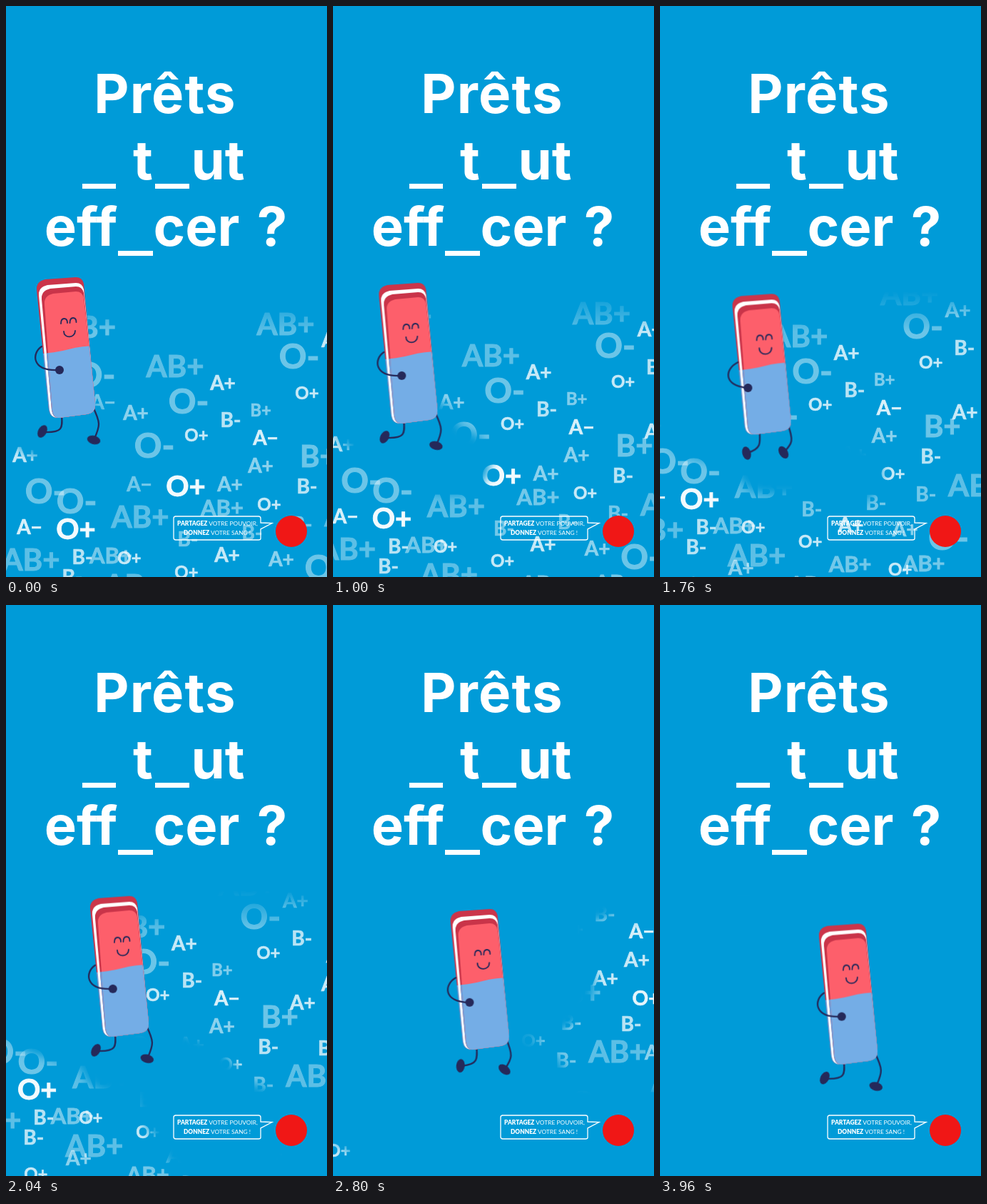
An HTML page that plays this animation: 450x800 px, repeating every 4 s.

```html
<!DOCTYPE html>
<html lang="fr">
<head>
<meta charset="utf-8">
<title>Prêts à tout effacer ?</title>
<style>
  html, body { margin: 0; width: 100%; height: 100%; overflow: hidden; background: #009bd8; }
  svg { display: block; width: 100vw; height: 100vh; }
  .title { font: 700 76px Inter, sans-serif; fill: #fff; text-anchor: middle; }
  .letters { font-family: Lato, sans-serif; font-weight: 700; fill: #fff; stroke: #fff; text-anchor: middle; }
  .letters text { stroke-width: .025em; }
  .slogan { font: 400 8.4px Lato, sans-serif; fill: #fff; text-anchor: middle; }
  .slogan tspan { font-weight: 900; }
  .line { fill: none; stroke: #25295a; stroke-width: 2.3; stroke-linecap: round; }
  .dark { fill: #25295a; }
</style>
</head>
<body>
<svg viewBox="0 0 450 800">
  <defs>
    <linearGradient id="fade" x1="0" y1="400" x2="0" y2="456" gradientUnits="userSpaceOnUse">
      <stop offset="0" stop-color="#000"/>
      <stop offset="1" stop-color="#fff"/>
    </linearGradient>
    <filter id="soft" x="-100" y="300" width="650" height="600" filterUnits="userSpaceOnUse">
      <feGaussianBlur stdDeviation="7"/>
    </filter>
    <mask id="rubbed" x="0" y="0" width="450" height="800" maskUnits="userSpaceOnUse">
      <rect width="450" height="800" fill="url(#fade)"/>
      <g filter="url(#soft)">
        <rect id="wake" x="-400" y="330" width="506" height="246"/>
        <g id="strokes" fill="none" stroke="#000" stroke-linecap="round" stroke-linejoin="round"/>
      </g>
    </mask>
    <clipPath id="sleeve"><path d="M40 488Q70 486 88 481T130 476V600H40Z"/></clipPath>
  </defs>

  <rect width="450" height="800" fill="#009bd8"/>
  <g mask="url(#rubbed)"><g id="letters" class="letters"></g></g>

  <g class="title">
    <text x="223" y="150" letter-spacing="1.2">Prêts</text>
    <text x="192" y="243">t</text>
    <text x="297" y="243">ut</text>
    <text x="105" y="336">eff</text>
    <text x="267" y="336">cer</text>
    <text x="373" y="336">?</text>
    <path d="M107 249h47v7h-47zM209 249h48v7h-48zM157 343h49v7h-49z"/>
  </g>

  <path d="M237 715H354Q357 715 357 718V724L373 724.5 357 733V746Q357 748 354 748H238Q235 748 235 745V718Q235 715 238 715" fill="none" stroke="#fff" stroke-width="1.3"/>
  <g class="slogan">
    <text x="296.5" y="728"><tspan>PARTAGEZ</tspan> VOTRE POUVOIR,</text>
    <text x="296" y="741"><tspan>DONNEZ</tspan> VOTRE SANG !</text>
  </g>
  <circle cx="400" cy="736" r="22" fill="#f01716"/>

  <g id="walker"><g id="bob">
    <path id="legL" class="line"/>
    <path id="legR" class="line"/>
    <ellipse id="footL" class="dark" rx="9.5" ry="6"/>
    <ellipse id="footR" class="dark" rx="9.5" ry="6"/>
    <circle id="handR" class="dark" r="5"/>
    <g id="body"></g>
    <path class="line" style="stroke-width:1.8" d="M77 445Q77 438 81.500 438T86 444M89.500 444Q89.500 437 94 437T98.500 443"/>
    <path id="smile" class="line" style="stroke-width:1.8"/>
    <path id="arm" class="line"/>
    <circle id="handL" class="dark" r="6"/>
  </g></g>
</svg>
<script>
const LOOP = 4000;
const SWING = 500;
const GLIDE = 'cubic-bezier(.35,0,.7,.8)';
const $ = id => document.getElementById(id);
const start = document.timeline.currentTime || 0;

function add(parent, tag, attrs, text = '') {
  const el = document.createElementNS('http://www.w3.org/2000/svg', tag);
  for (const key in attrs) el.setAttribute(key, attrs[key]);
  el.textContent = text;
  return parent.appendChild(el);
}

function play(el, frames, options) {
  el.animate(frames, { iterations: Infinity, ...options }).startTime = start;
}

const glide = (id, x, y) => play($(id), {
  transform: ['translate(0,0)', `translate(${x}px,${y}px)`]
}, { duration: LOOP, easing: GLIDE });

// label, size, opacity, centres
const groups = [
  ['AB+', 42, .36, '392,446 237,505 188,716 35,776 178,812 487,714 575,755'],
  ['AB+', 31, .45, '303,703 147,770 309,824 412,823 253,852'],
  ['O-', 48, .42, '411,491 125,517 256,554 208,616 55,680 99,694 447,787'],
  ['B+', 42, .42, '128,450 438,631'],
  ['B+', 24, .5, '357,566'],
  ['A+', 28, .78, '304,528 27,629 460,468 470,611 514,585 310,769'],
  ['A+', 28, .55, '182,570 357,644 314,670 386,775 156,829 543,715'],
  ['A−', 28, .85, '364,605 33,730 521,545'],
  ['A−', 28, .45, '136,555 187,670'],
  ['B-', 28, .72, '315,580 469,521 422,673 107,772 93,800 506,675'],
  ['B-', 28, .45, '255,747 345,738 415,726'],
  ['O+', 40, .95, '252,673 98,733'],
  ['O+', 24, .78, '422,542 267,601 369,698 173,773 253,793 96,852 313,863 379,832'],
  ['O+', 28, .9, '527,639']
];
for (const [label, size, opacity, places] of groups) {
  for (const place of places.split(' ')) {
    const [x, y] = place.split(',').map(Number);
    add($('letters'), 'text', { x, y: y + size * .36, 'font-size': size, opacity }, label);
  }
}
glide('letters', -131, -131);

// rubbing strokes: path, width, [time, drawn share] steps
const strokes = [
  ['M50 585L100 600 130 596 150 638 232 640 264 655', 92, [[0, .2], [640, .34], [1320, .87], [1760, 1]]],
  ['M255 680L290 740 440 752', 150, [[1760, 0], [2320, 1]]],
  ['M180 400L365 412', 60, [[1760, 0], [2320, 1]]],
  ['M220 770L50 650 50 770', 220, [[2320, 0], [3100, 1]]],
  ['M200 480L278 450 280 515 320 590 385 685', 160, [[2360, 0], [3300, 1]]],
  ['M415 400L400 520 430 660', 190, [[3360, 0], [3880, 1]]]
];
for (const [d, width, steps] of strokes) {
  const path = add($('strokes'), 'path', { d, 'stroke-width': width, pathLength: 1, 'stroke-dasharray': '1 9' });
  const all = [[0, steps[0][1]], ...steps, [LOOP, 1]];
  play(path, all.map(([time, share]) => ({
    offset: time / LOOP,
    strokeDashoffset: share ? 1 - share : 1.01
  })), { duration: LOOP });
}
glide('wake', 181, 67);

function slab(x, y, base, red, blue) {
  const d = `M${x} ${y}q-1-12 12-15L98 ${y - 18}q9 0 11 9L125 557q1 13-12 15L74 577Q${base + 2} 578 ${base} 566Z`;
  add($('body'), 'path', { d, fill: red });
  if (blue) add($('body'), 'path', { d, fill: blue, 'clip-path': 'url(#sleeve)' });
}
slab(43, 398, 60, '#cb354a', '#689fdd');
slab(46, 406, 61, '#fff');
slab(50, 411, 64, '#c93449', '#689fdd');
slab(54, 418, 65, '#fd5f6b', '#74ade6');

const swing = (id, frames) => play($(id), frames, {
  duration: SWING, direction: 'alternate', easing: 'cubic-bezier(.72,0,.28,1)'
});
const bend = (id, a, b) => swing(id, { d: [a, b].map(d => `path("${d}")`) });
const shift = (id, a, b) => swing(id, {
  transform: [a, b].map(([x, y, turn = 0]) => `translate(${x}px,${y}px) rotate(${turn}deg)`)
});

glide('walker', 181, 67);
shift('bob', [0, 0], [0, 4]);
bend('legL', 'M78 572C79 590 81 598 54 597', 'M85 572C87 590 85 596 79 610');
bend('legR', 'M121 560C133 584 132 588 124 606', 'M119 563C124 588 120 592 105 594');
shift('footL', [51, 596, 118], [79, 613, 15]);
shift('footR', [123, 608, 15], [103, 594, 118]);
shift('handR', [112, 511], [120.5, 511]);
bend('smile', 'M81 456C81 466 97 466 97 455', 'M80 456C80 469 99 469 99 456');
bend('arm', 'M50 477C36 486 35 512 74 510', 'M52 474C27 483 21 504 50 514');
shift('handL', [75, 510], [51, 514]);
</script>
</body>
</html>
```
